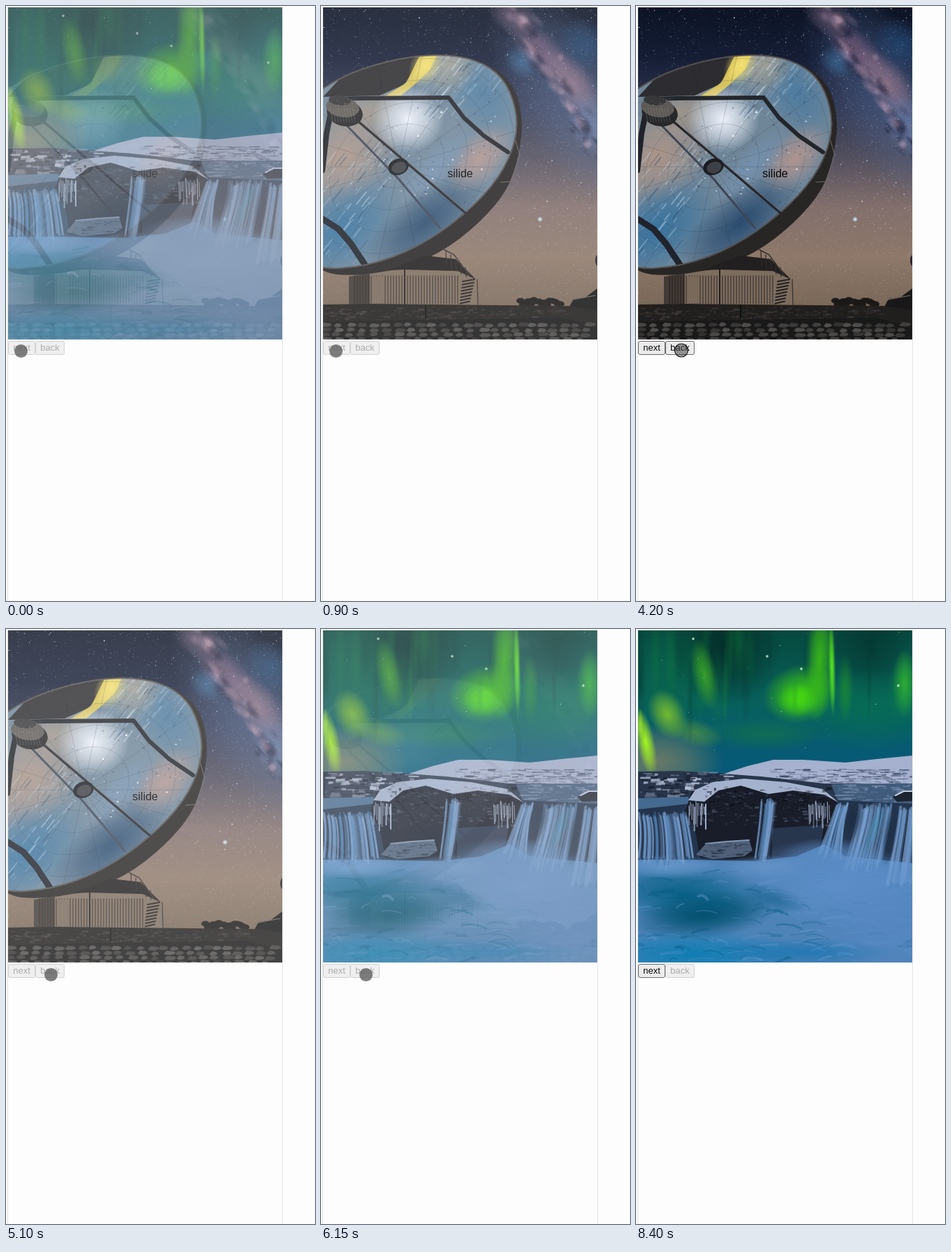
Recreate the animation shown at these times as an HTML page with a canvas. Size 443 by 851 pixels, loop 8700 ms.

```html
<!DOCTYPE html>
<html lang="en">
<head>
<meta charset="utf-8">
<title>Slide fade</title>
<style>
  html, body { margin: 0; width: 100%; height: 100%; overflow: hidden; background: #fdfdfd; }
  canvas { display: block; }
</style>
</head>
<body>
<canvas id="stage" width="443" height="851"></canvas>
<script>
const LOOP = 8700, STEP = 150;
const FONT = '"Liberation Sans", Arial, sans-serif';
const ctx = document.getElementById('stage').getContext('2d');

let seed = 7;
function rnd(a = 0, b = 1) {
  seed = (seed + 0x6D2B79F5) | 0;
  let v = Math.imul(seed ^ (seed >>> 15), 1 | seed);
  v = (v + Math.imul(v ^ (v >>> 7), 61 | v)) ^ v;
  return a + (b - a) * ((v ^ (v >>> 14)) >>> 0) / 4294967296;
}

function layer(paint) {
  const c = document.createElement('canvas');
  c.width = 396;
  c.height = 477;
  const g = c.getContext('2d');
  g.rect(3, 2, 393, 475);
  g.clip();
  g.lineCap = g.lineJoin = 'round';
  paint(g);
  return c;
}

function vertical(g, y0, y1, colors) {
  const f = g.createLinearGradient(0, y0, 0, y1);
  colors.forEach((c, i) => f.addColorStop(i / (colors.length - 1), c));
  return f;
}

function glow(g, x, y, rx, ry, rot, rgb, alpha) {
  g.save();
  g.translate(x, y);
  g.rotate(rot);
  g.scale(rx, ry);
  const f = g.createRadialGradient(0, 0, 0, 0, 0, 1);
  f.addColorStop(0, `rgba(${rgb},${alpha})`);
  f.addColorStop(0.5, `rgba(${rgb},${alpha * 0.6})`);
  f.addColorStop(1, `rgba(${rgb},0)`);
  g.fillStyle = f;
  g.fillRect(-1, -1, 2, 2);
  g.restore();
}

function trace(g, p) {
  g.beginPath();
  for (let i = 0; i < p.length; i += 2) g.lineTo(p[i], p[i + 1]);
}

function poly(g, p, fill) {
  trace(g, p);
  g.closePath();
  g.fillStyle = fill;
  g.fill();
}

function line(g, p, color, width) {
  trace(g, p);
  g.strokeStyle = color;
  g.lineWidth = width;
  g.stroke();
}

// Closed curve through the midpoints of a polygon
function curve(g, p) {
  const n = p.length, mid = i => (p[i % n] + p[(i + 2) % n]) / 2;
  g.beginPath();
  g.moveTo(mid(0), mid(1));
  for (let i = 2; i <= n; i += 2) {
    g.quadraticCurveTo(p[i % n], p[(i + 1) % n], mid(i), mid(i + 1));
  }
  g.closePath();
}

function oval(g, x, y, rx, ry, rot, fill) {
  g.beginPath();
  g.ellipse(x, y, rx, ry, rot, 0, 7);
  g.fillStyle = fill;
  g.fill();
}

function specks(g, n, x0, y0, x1, y1, rgb, max, w = 1, h = 1) {
  for (let i = 0; i < n; i++) {
    g.fillStyle = `rgba(${rgb},${rnd(0.1, max)})`;
    g.fillRect(rnd(x0, x1), rnd(y0, y1), rnd(0.6, w), rnd(0.6, h));
  }
}

function nightSky(g) {
  g.fillStyle = vertical(g, 2, 430, ['#0c1324', '#151d35', '#303650', '#514e5d', '#826f6c', '#8d7869', '#796758']);
  g.fillRect(0, 0, 396, 477);
  glow(g, 360, 130, 190, 85, 1, '80,105,150', 0.55);
  glow(g, 275, 12, 40, 30, 0.8, '125,100,125', 0.6);
  glow(g, 315, 65, 55, 28, 0.8, '165,115,145', 0.55);
  glow(g, 360, 110, 60, 30, 0.9, '185,135,150', 0.6);
  glow(g, 390, 170, 50, 35, 1.1, '120,140,185', 0.55);
  glow(g, 288, 80, 28, 22, 0.6, '70,130,180', 0.5);
  glow(g, 380, 55, 45, 35, 0.7, '35,75,120', 0.7);
  for (let i = 0; i < 65; i++) {
    const u = rnd();
    glow(g, 270 + u * 130 + rnd(-16, 16), 5 + u * 205 + rnd(-28, 28), rnd(5, 19), rnd(3, 10), 0.8,
      rnd() < 0.6 ? '20,22,45' : '200,160,180', rnd(0.15, 0.5));
  }
  specks(g, 2300, 3, 2, 396, 425, '215,225,255', 0.45, 1.3, 1.3);
  specks(g, 900, 265, 2, 396, 425, '235,225,230', 0.5);
  specks(g, 230, 3, 2, 396, 320, '240,245,255', 0.95, 1.8, 1.8);
  glow(g, 314, 305, 4, 4, 0, '210,240,255', 1);
}

function dishFace(g) {
  const rim = [-70, 240, -35, 145, 25, 102, 95, 78, 165, 68, 222, 76, 261, 101, 280, 145,
    281, 190, 257, 245, 207, 298, 140, 345, 65, 373, -10, 377, -60, 340];
  curve(g, [-60, 200, 20, 104, 165, 69, 230, 78, 275, 108, 290, 160, 284, 214, 268, 263,
    228, 310, 170, 355, 90, 386, -30, 383]);
  g.fillStyle = '#282625';
  g.fill();
  line(g, [278, 190, 285, 213, 272, 251, 258, 252], '#6d6867', 1);
  g.save();
  curve(g, rim);
  g.clip();
  g.fillStyle = '#6f8699';
  g.fillRect(0, 0, 396, 477);
  glow(g, 30, 215, 95, 65, -0.6, '178,150,133', 0.9);
  glow(g, 30, 320, 100, 60, -0.6, '50,112,158', 0.9);
  glow(g, 150, 310, 105, 45, -0.65, '38,72,108', 0.95);
  glow(g, 230, 125, 70, 50, 0.9, '70,120,160', 0.8);
  glow(g, 228, 218, 60, 35, -0.8, '185,150,142', 0.85);
  glow(g, 165, 230, 75, 25, -0.8, '120,150,185', 0.65);
  glow(g, 65, 150, 65, 35, -0.4, '165,150,135', 0.8);
  glow(g, 185, 85, 40, 45, 0.5, '165,160,145', 0.85);
  poly(g, [3, 130, 40, 90, 155, 60, 142, 85, 118, 113, 84, 128], '#2d2c30');
  poly(g, [142, 70, 166, 70, 156, 91, 138, 109, 115, 128, 92, 129, 122, 110], 'rgba(232,205,80,0.85)');
  glow(g, 150, 85, 22, 32, 0.5, '250,232,120', 0.8);
  glow(g, 125, 162, 52, 48, 0, '245,247,255', 0.95);
  for (let i = 0; i < 210; i++) {
    const a = i % 2 ? rnd(-1.15, -0.35) : rnd(1.9, 2.8);
    const r = rnd(35, i % 2 ? 155 : 220), len = rnd(3, 24);
    const x = 112 + Math.cos(a) * r, y = 185 + Math.sin(a) * r;
    line(g, [x, y, x + len * 0.62, y - len * 0.78],
      `rgba(${rnd() < 0.7 ? '205,228,248' : '40,75,115'},${rnd(0.1, 0.45)})`, rnd(0.6, 2.4));
  }
  for (let i = 0; i < 18; i++) {
    const a = i * Math.PI / 9;
    line(g, [111, 230, 111 + Math.cos(a) * 240, 230 + Math.sin(a) * 200], 'rgba(30,35,50,0.23)', 0.8);
  }
  for (let r = 35; r < 220; r += 36) {
    g.beginPath();
    g.ellipse(111, 230, r, r * 0.78, -0.65, 0, 7);
    g.strokeStyle = 'rgba(30,35,50,0.22)';
    g.stroke();
  }
  specks(g, 110, 70, 80, 265, 280, '20,25,35', 0.7, 2, 2);
  specks(g, 55, 70, 145, 250, 270, '255,255,255', 0.9, 3, 2.4);
  line(g, [3, 305, 25, 319, 43, 340, 63, 370], '#20242c', 9);
  g.restore();
  curve(g, rim);
  g.strokeStyle = '#54504e';
  g.lineWidth = 2;
  g.stroke();
}

function dishArms(g) {
  line(g, [36, 170, 110, 246, 170, 317], '#3d4655', 3);
  line(g, [45, 158, 207, 296], '#25262c', 3);
  line(g, [46, 156, 207, 293], '#706c6b', 0.7);
  line(g, [14, 152, 8, 182, 2, 235], '#20242a', 8);
  line(g, [18, 133, 60, 132, 183, 131, 205, 160, 234, 186, 268, 209], '#23262b', 6);
  oval(g, 111, 230, 15, 11.5, -0.35, '#1b1d22');
  oval(g, 112, 231, 11, 8, -0.35, '#3d4046');
  oval(g, 34, 153, 26, 19, 0.2, '#27272a');
  oval(g, 31, 145, 24, 14, 0.15, '#5c5956');
  oval(g, 27, 135, 16, 7, 0.1, '#37373a');
  for (let i = 0; i < 9; i++) line(g, [13 + i * 4, 146, 17 + i * 4, 166], 'rgba(150,140,130,0.35)', 1);
  specks(g, 35, 14, 132, 53, 150, '185,175,165', 0.6, 2);
}

function dishBase(g) {
  poly(g, [40, 387, 72, 382, 72, 428, 40, 428], '#413a35');
  poly(g, [70, 383, 120, 375, 202, 374, 222, 394, 225, 428, 70, 428], '#7d6d5f');
  for (let x = 48; x < 200; x += 4) line(g, [x, 386, x, 426], 'rgba(35,30,28,0.55)', 1.6);
  line(g, [120, 377, 120, 427], '#211f1e', 2);
  poly(g, [73, 387, 91, 387, 91, 425, 73, 425], '#79695b');
  poly(g, [95, 378, 150, 357, 193, 362, 222, 391, 196, 379, 120, 377], '#211f1f');
  line(g, [176, 348, 191, 356, 213, 386], '#3b3431', 1.5);
  for (let i = 0; i < 5; i++) line(g, [179 + i * 7, 350 + i * 6, 180 + i * 7, 371 + i * 4], '#302b29', 1.2);
  for (let i = 0; i < 8; i++) line(g, [203 - i * 0.5, 394 + i * 4.5, 220 - i, 391 + i * 4.5], '#24201f', 2);
  line(g, [224, 391, 225, 427], '#332d2a', 1.2);
  for (let i = 0; i < 16; i++) oval(g, 286 + i * 3.8, 424 + rnd(-4, 3), 6, 4, 0, '#1b1918');
  poly(g, [355, 432, 362, 419, 380, 416, 396, 404, 396, 453, 365, 448], '#191819');
  line(g, [361, 420, 393, 414], '#77706a', 1);
  oval(g, 397, 364, 4, 8, 0, '#28272a');
  poly(g, [3, 427, 70, 426, 355, 429, 396, 435, 396, 477, 3, 477], '#211f1e');
  specks(g, 180, 3, 430, 350, 450, '100,90,84', 0.35, 10, 3);
  line(g, [150, 428, 150, 446], '#0f0f10', 2);
  poly(g, [3, 452, 120, 449, 345, 446, 396, 458, 396, 477, 3, 477], '#1a1919');
  for (let row = 0; row < 4; row++) {
    for (let x = 0; x < 380; x += rnd(13, 20)) {
      const y = 455 + row * 7 + rnd(-1, 1), w = rnd(9, 15), v = rnd(50, 82) | 0;
      poly(g, [x, y + 2, x + 4, y - 2, x + w, y - 1, x + w + 2, y + 2, x + w - 3, y + 4, x + 3, y + 4],
        `rgb(${v},${v - 2},${v - 4})`);
    }
  }
}

function paintDish(g) {
  nightSky(g);
  dishFace(g);
  dishArms(g);
  dishBase(g);
  g.font = '16px ' + FONT;
  g.fillStyle = '#08080a';
  g.fillText('silide', 181.3, 245);
}

function aurora(g) {
  g.fillStyle = vertical(g, 2, 215, ['#07483f', '#07564e', '#08605c', '#075a70', '#075a7a']);
  g.fillRect(0, 0, 396, 477);
  glow(g, 125, 25, 85, 85, 0, '2,38,34', 0.75);
  glow(g, 335, 20, 60, 80, 0, '3,48,42', 0.6);
  glow(g, 335, 115, 110, 60, 0, '5,112,82', 0.7);
  glow(g, 30, 190, 95, 55, 0, '112,123,102', 0.95);
  glow(g, 185, 150, 90, 24, 0, '20,115,75', 0.7);
  glow(g, 50, 65, 65, 90, 0, '10,105,72', 0.6);
  glow(g, 98, 65, 18, 52, -0.2, '70,180,35', 0.8);
  glow(g, 45, 122, 26, 38, -0.45, '125,195,45', 0.9);
  glow(g, 85, 148, 42, 20, 0.3, '90,155,60', 0.65);
  glow(g, 14, 162, 13, 50, -0.2, '165,245,30', 1);
  glow(g, 6, 135, 5, 22, 0, '180,245,40', 0.7);
  glow(g, 236, 93, 55, 42, -0.25, '62,205,15', 0.95);
  glow(g, 232, 102, 30, 24, 0, '80,230,10', 0.7);
  glow(g, 263, 45, 21, 92, 0.05, '60,190,20', 0.9);
  glow(g, 281, 55, 5, 72, -0.02, '95,240,25', 0.95);
  glow(g, 300, 85, 12, 50, 0, '35,150,40', 0.6);
  glow(g, 385, 78, 18, 50, 0, '50,185,45', 0.85);
  for (let i = 0; i < 26; i++) {
    glow(g, rnd(3, 396), rnd(10, 110), rnd(4, 12), rnd(35, 75), 0, rnd() < 0.5 ? '20,130,60' : '3,50,45', 0.24);
  }
  specks(g, 32, 3, 2, 396, 175, '200,245,225', 0.8, 1.5, 1.5);
  for (const [x, y] of [[237, 57], [376, 81], [82, 14], [188, 39]]) glow(g, x, y, 2.5, 2.5, 0, '230,255,230', 1);
}

function snowLand(g) {
  poly(g, [3, 204, 60, 203, 130, 207, 396, 200, 396, 265, 3, 265], '#28354a');
  poly(g, [126, 207, 160, 196, 197, 187, 240, 187, 300, 191, 345, 186, 396, 181, 396, 222, 270, 221, 180, 211], '#a5b1ce');
  specks(g, 240, 190, 200, 396, 222, '42,55,82', 0.7, 17, 1.6);
  specks(g, 65, 3, 204, 130, 238, '180,192,217', 0.9, 19, 5);
  specks(g, 75, 3, 205, 120, 240, '20,26,38', 0.9, 10, 4);
  poly(g, [3, 242, 75, 240, 82, 266, 3, 268], '#456a8f');
  poly(g, [280, 222, 396, 221, 396, 250, 290, 248], '#405b7b');
  specks(g, 70, 280, 222, 396, 247, '160,178,208', 0.6, 20, 2);
  poly(g, [368, 240, 385, 231, 396, 231, 396, 246, 374, 247], '#1d2431');
  line(g, [372, 238, 384, 232, 396, 232], '#c2cce0', 2);
}

function cliff(g) {
  poly(g, [3, 258, 75, 250, 290, 245, 396, 250, 396, 345, 3, 335], '#24344c');
  poly(g, [70, 262, 80, 233, 110, 220, 155, 214, 215, 219, 268, 229, 290, 250, 278, 285, 262, 318, 205, 332, 92, 327, 84, 285], '#191d29');
  poly(g, [195, 285, 270, 280, 262, 320, 195, 331], '#27354d');
  poly(g, [75, 245, 85, 230, 110, 219, 155, 214, 215, 219, 268, 229, 290, 248, 270, 237, 225, 231, 190, 236, 150, 224, 118, 231, 98, 247], '#a4b2ce');
  specks(g, 130, 85, 232, 275, 280, '90,104,132', 0.55, 8, 3);
  specks(g, 90, 92, 224, 280, 260, '10,13,20', 0.8, 8, 4);
  for (let i = 0; i < 26; i++) {
    const x = i < 13 ? 76 + i * 2 : 248 + (i - 13) * 2.4, y = rnd(246, 255);
    line(g, [x, y, x + rnd(-1, 1), y + rnd(10, 36)], `rgba(175,190,218,${rnd(0.4, 0.9)})`, rnd(1, 2.6));
  }
  poly(g, [86, 323, 100, 307, 162, 301, 167, 317, 155, 325, 110, 329], '#4f6078');
  line(g, [100, 307, 130, 304, 162, 302], '#8296b1', 2);
  specks(g, 55, 95, 305, 164, 325, '28,38,54', 0.7, 11, 2);
}

// Strands of falling water between an upper and a lower span
function fall(g, n, top, y0, bottom, y1, bend) {
  for (let i = 0; i < n; i++) {
    const u = rnd(), a = top[0] + u * (top[1] - top[0]), b = bottom[0] + u * (bottom[1] - bottom[0]);
    g.beginPath();
    g.moveTo(a, y0 + rnd(-3, 7));
    g.quadraticCurveTo(a + bend, y0 + 25, b, y1 - rnd(0, 15));
    g.strokeStyle = `rgba(${rnd() < 0.7 ? '125,165,214' : '75,125,175'},${rnd(0.2, 0.6)})`;
    g.lineWidth = rnd(1, 4);
    g.stroke();
  }
}

function water(g) {
  poly(g, [3, 330, 80, 330, 170, 332, 230, 325, 270, 308, 300, 325, 396, 335, 396, 477, 3, 477], '#4e83b8');
  glow(g, 70, 380, 125, 45, 0.1, '4,95,132', 0.95);
  glow(g, 95, 410, 105, 35, -0.1, '0,78,108', 0.95);
  glow(g, 200, 385, 50, 18, 0.3, '8,90,130', 0.8);
  glow(g, 80, 465, 160, 35, 0, '12,125,178', 0.95);
  glow(g, 245, 462, 130, 20, 0, '20,115,175', 0.7);
  for (let i = 0; i < 150; i++) {
    const x = rnd(-10, 390), y = rnd(345, 477), w = rnd(8, 38), h = rnd(-7, 7);
    g.beginPath();
    g.moveTo(x, y);
    g.quadraticCurveTo(x + w / 2, y - rnd(1, 6), x + w, y + h);
    const dark = rnd() < (x < 215 ? 0.55 : 0.25);
    g.strokeStyle = `rgba(${dark ? '4,90,130' : '98,150,205'},${rnd(0.15, 0.45)})`;
    g.lineWidth = rnd(1, 4.5);
    g.stroke();
  }
  glow(g, 290, 365, 140, 65, 0.1, '94,142,200', 0.95);
  glow(g, 365, 420, 110, 65, 0, '88,135,195', 0.8);
  glow(g, 45, 340, 75, 18, 0, '110,155,207', 0.8);
  glow(g, 185, 340, 65, 17, 0, '102,148,200', 0.85);
}

function paintFalls(g) {
  aurora(g);
  snowLand(g);
  cliff(g);
  water(g);
  fall(g, 60, [3, 72], 264, [3, 82], 338, 5);
  fall(g, 24, [179, 201], 246, [170, 190], 334, -1);
  fall(g, 32, [288, 304], 252, [262, 294], 332, -8);
  fall(g, 45, [320, 366], 253, [298, 350], 348, -2);
  fall(g, 34, [378, 405], 255, [358, 396], 370, -2);
  glow(g, 311, 272, 14, 34, 0.2, '28,45,68', 0.85);
  glow(g, 364, 295, 10, 48, 0.15, '30,48,72', 0.85);
  glow(g, 342, 285, 10, 48, 0.4, '65,150,185', 0.45);
  glow(g, 280, 330, 80, 32, 0, '90,138,195', 0.75);
  glow(g, 350, 355, 70, 32, 0, '92,140,198', 0.65);
}

const dish = layer(paintDish);
const falls = layer(paintFalls);

function button(x, w, label, on) {
  ctx.beginPath();
  ctx.roundRect(x + 0.5, 479.5, w - 1, 19, 2.5);
  ctx.fillStyle = on ? '#ebebeb' : '#efefef';
  ctx.fill();
  ctx.strokeStyle = on ? '#6a6a6a' : '#d2d2d2';
  ctx.lineWidth = 1;
  ctx.stroke();
  ctx.font = '13px ' + FONT;
  ctx.fillStyle = on ? '#0a0a0a' : '#acacac';
  ctx.fillText(label, x + 7.3, 493);
}

// Each stop: start time, x, y
const stops = [[0, 21.5, 493.5], [1500, 29, 494], [1650, 51, 495], [1800, 65, 495], [4200, 65, 492.5],
  [4350, 64.5, 494.5], [6450, 63.5, 494.5], [7050, 165, 610], [7200, 347, 844], [7350, -50, -50]];

function pointer(t) {
  const [, x, y] = stops.filter(s => s[0] <= t).pop();
  const hit = t === 4200;
  ctx.beginPath();
  ctx.arc(x, y, 9.5, 0, 7);
  ctx.fillStyle = hit ? 'rgba(70,70,70,0.55)' : 'rgba(85,85,85,0.75)';
  ctx.fill();
  if (hit) {
    ctx.strokeStyle = '#1c1c1c';
    ctx.lineWidth = 1.2;
    ctx.stroke();
  }
}

function dishAlpha(t) {
  if (t < 1200) return 0.5 + 0.5 * t / 1200;
  if (t < 4200) return 1;
  return t < 6600 ? 1 - ((t - 4200) / 2400) ** 1.7 : 0;
}

function fallsAlpha(t) {
  if (t < 800) return 0.53 * (1 - t / 800);
  return Math.min(1, Math.max(0, (t - 5100) / 1450));
}

function slide(img, alpha) {
  ctx.globalAlpha = alpha;
  ctx.drawImage(img, 0, 0);
  ctx.globalAlpha = 1;
}

function draw(t) {
  ctx.fillStyle = '#fdfdfd';
  ctx.fillRect(0, 0, 443, 851);
  ctx.strokeStyle = '#e3e3e3';
  ctx.lineWidth = 1;
  ctx.strokeRect(2.5, 1.5, 394, 860);
  slide(dish, dishAlpha(t));
  slide(falls, fallsAlpha(t));
  const ready = t >= 3150 && t < 4350;
  button(3, 39, 'next', ready || t >= 8400);
  button(42, 42, 'back', ready);
  pointer(t);
}

const begin = performance.now();
function tick() {
  const t = (performance.now() - begin) % LOOP;
  draw(Math.floor(t / STEP) * STEP);
  requestAnimationFrame(tick);
}
tick();
</script>
</body>
</html>
```
